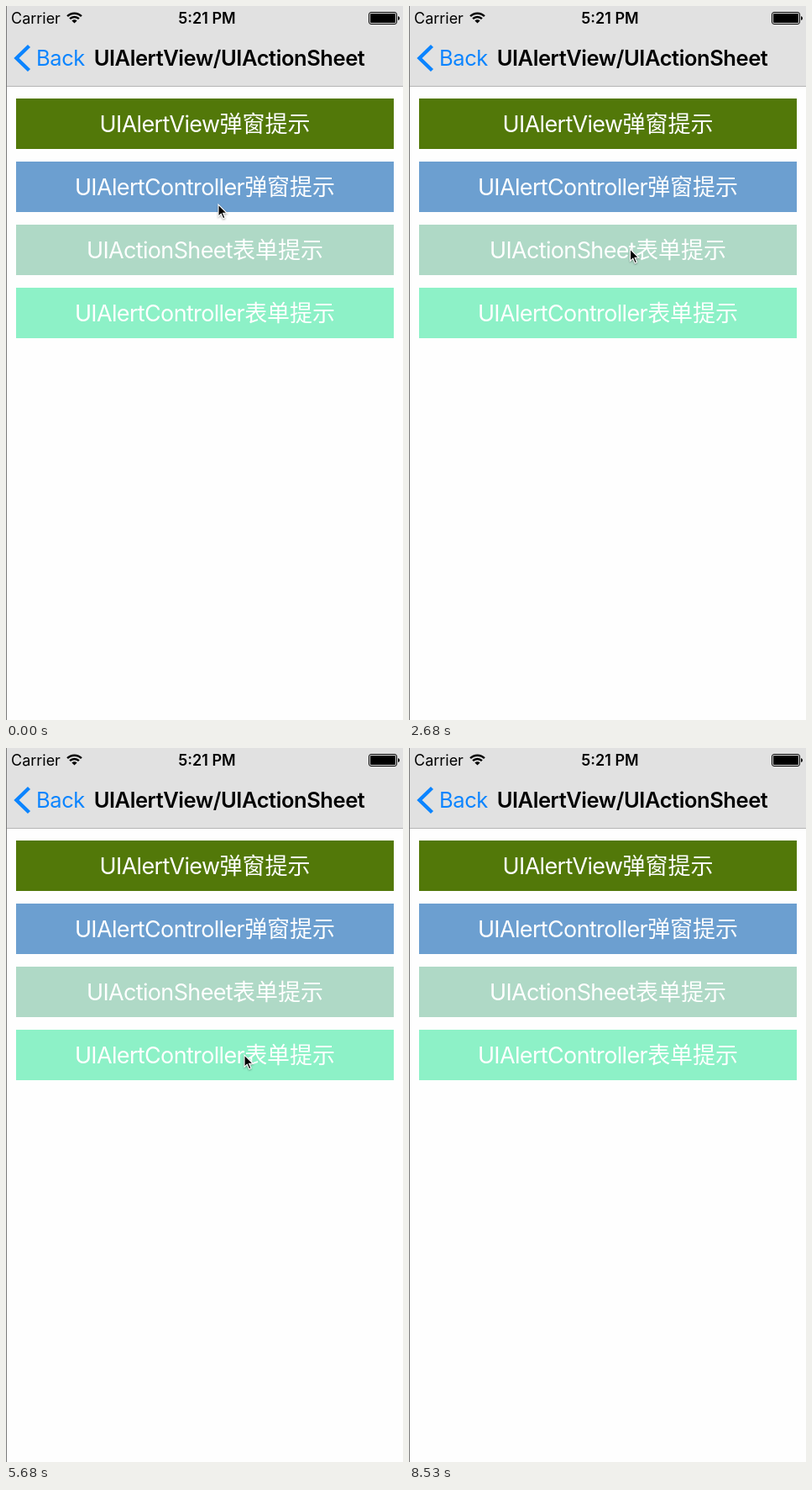
An HTML page for the animation above (8.9 s loop, 473 by 849 pixels).

```html
<!DOCTYPE html>
<html lang="zh-CN">
<head>
<meta charset="utf-8">
<title>UIAlertView/UIActionSheet</title>
<style>
html, body { margin: 0; width: 100%; height: 100%; overflow: hidden; background: #fefefe; }
body {
  position: relative; color: #000; white-space: nowrap;
  font-family: Inter, "Noto Sans CJK SC", "Noto Sans CJK", sans-serif;
}
#stage { position: absolute; left: 0; top: 0; width: 473px; height: 849px; overflow: hidden; background: #fefefe; }
#stage div, svg { position: absolute; box-sizing: border-box; }
.nav { left: 0; top: 0; width: 473px; height: 96px; background: #e1e1e1; border-bottom: 1px solid #b5b5b5; }
.edge { left: 0; top: 0; width: 1px; height: 849px; background: #7a7a7a; }
.dim { left: 0; top: 0; width: 473px; height: 849px; background: #000; opacity: 0; }
.bar { top: 4px; line-height: 21px; font-size: 18px; }
.head { top: 44px; line-height: 36px; font-size: 25.5px; letter-spacing: -.017em; }
.btn { left: 12px; width: 450px; height: 60px; line-height: 61px; font-size: 27px; color: #fff; text-align: center; }
.btn span { letter-spacing: -.024em; }
.bold { font-weight: 600; }
.medium { font-weight: 500; }
.alert, .sheet, .cancel { overflow: hidden; border-radius: 20px; text-align: center; }
.alert div, .sheet div, .cancel div { left: 0; width: 100%; }
.alert { left: 34.5px; top: 230px; width: 405px; height: 390px; background: rgba(252,252,252,.96); }
.row { border-top: 1px solid #dfdfdf; color: #0b84ff; }
.alert .row { height: 66.2px; line-height: 64px; font-size: 25.5px; }
.sheet .row, .cancel div { height: 86px; line-height: 83px; font-size: 30px; color: #0b84ff; }
.sheet, .cancel { left: 12px; width: 450px; }
.sheet {
  top: 389px; height: 349px;
  background: linear-gradient(#f5f9fb 18px, #fbfcfc 30px) 0 calc(var(--y, 0) * -1px) / 100% 349px no-repeat #fafbfb;
}
.cancel { top: 750px; height: 86px; background: #fbfcfc; }
.note { font-size: 19.5px; line-height: 26px; }
.note span { letter-spacing: -.006em; }
.grey { color: #929292; }
.row.on { background: #ececec; }
.row.on, .row.on + .row { border-color: #ececec; }
</style>
</head>
<body>
<div id="stage">
  <div class="nav"></div>
  <div class="btn" style="top:110px;background:#527809"><span>UIAlertView</span>弹窗提示</div>
  <div class="btn" style="top:185px;background:#6c9fd0"><span>UIAlertController</span>弹窗提示</div>
  <div class="btn" style="top:260px;background:#afd9c6"><span>UIActionSheet</span>表单提示</div>
  <div class="btn" style="top:335px;background:#8df1c7"><span>UIAlertController</span>表单提示</div>

  <div id="back">
    <svg width="40" height="96" style="left:0;top:0"><path d="M27.5 47.5 12.5 62l15 14.5" fill="none" stroke="currentColor" stroke-width="4.4"/></svg>
    <div class="head" style="left:36px">Back</div>
  </div>
  <div class="dim" id="dim"></div>

  <div class="bar" style="left:6px">Carrier</div>
  <div class="bar bold" style="left:139.5px;width:200px;text-align:center">5:21 PM</div>
  <div class="head bold" style="left:66px;width:400px;text-align:center">UIAlertView/UIActionSheet</div>
  <svg width="473" height="30" style="left:0;top:0">
    <g fill="none" stroke="#000" stroke-width="2.5">
      <path d="M73.1 12.1a11.9 11.9 0 0 1 16.8 0M76.1 15.1a7.7 7.7 0 0 1 10.8 0"/>
    </g>
    <path d="M81.5 20.6l-3.1-3.1a4.4 4.4 0 0 1 6.2 0z"/>
    <rect x="432.5" y="7.5" width="33" height="14" rx="2.5" fill="none" stroke="#000"/>
    <rect x="434" y="9" width="30" height="11" rx="1"/>
    <path d="M467 12q2 .5 2 2.5t-2 2.5z"/>
  </svg>

  <div class="alert" id="alert">
    <div class="medium" style="top:27px;line-height:36px;font-size:25.5px">温馨提示</div>
    <div class="note" style="top:70px"><span>UIAlertController</span>弹窗提示</div>
    <div class="row" style="top:126px">知道了</div>
    <div class="row" style="top:192.5px">拒绝了</div>
    <div class="row" style="top:258.5px">警告了</div>
    <div class="row medium" style="top:325px" id="alertCancel">取消</div>
  </div>

  <div id="sheetGroup" style="left:0;top:0">
    <div class="sheet">
      <div class="note grey medium" style="top:21px">温馨提示</div>
      <div class="note grey" style="top:47px"><span id="kind"></span>表单提示</div>
      <div class="row" style="top:93px">知道了</div>
      <div class="row" style="top:179px" id="refuse">拒绝了</div>
      <div class="row" style="top:264.5px" id="warn">警告了</div>
    </div>
    <div class="cancel"><div class="medium" style="top:0">取消</div></div>
  </div>

  <div class="edge"></div>
  <svg id="cursor" width="18" height="24" viewBox="-2 -2 18 24" style="left:-2px;top:-2px">
    <path d="M0 0V14.2L3.3 11.2 5.7 16.8 8 15.8 5.6 10.3H10.2Z" fill="#000" stroke="#fff" stroke-width="1.1"
      style="filter:drop-shadow(0 1px 1px rgba(0,0,0,.35))"/>
  </svg>
</div>
<script>
const LOOP = 8900, TRAVEL = 468, DIM = .36;
const $ = id => document.getElementById(id);

// pointer stops: time, x, y
const path = [
  [0, 253, 236], [150, 253, 208], [750, 253, 208], [1790, 235.5, 582],
  [2230, 235.5, 582], [2680, 263.5, 289], [3130, 263.5, 289], [4330, 255, 776],
  [4630, 255, 776], [4930, 263.5, 673.5], [5380, 263.5, 673.5], [5680, 284, 365],
  [6280, 284, 365], [6880, 245.5, 638], [8080, 245.5, 638], [8230, 272, 688],
  [8380, 366, 838], [8530, 440, 900]
];

function tick(t) {
  const base = t < 1490 ? 0 : t < 1930 ? 1490 : 1930;
  return base + Math.floor((t - base) / 150) * 150;
}

// critically damped spring, 0 to 1
function spring(ms) {
  if (ms <= 0) return 0;
  const w = ms * .0228, rest = (1 + w) * Math.exp(-w);
  return rest < .02 ? 1 : 1 - rest;
}

const shown = (t, from, to) => spring(t - from) - spring(t - to);

function pointer(t) {
  const i = path.findIndex(p => p[0] > t);
  if (i < 0) return path[path.length - 1].slice(1);
  const [t0, x0, y0] = path[i - 1], [t1, x1, y1] = path[i];
  const k = 1 - (1 - (t - t0) / (t1 - t0)) ** 3;
  return [x0 + (x1 - x0) * k, y0 + (y1 - y0) * k];
}

function press(id, t, from) {
  $(id).classList.toggle("on", t >= from && t < from + 300);
}

function draw(t) {
  const alert = shown(t, 390, 1960);
  const sheet = shown(t, 2920, 5100) + shown(t, 6070, 7200);
  const cover = Math.max(alert, sheet);
  const mix = (a, b) => Math.round(a + (b - a) * cover);

  $("dim").style.opacity = cover * DIM;
  $("back").style.color = `rgb(${mix(11, 140)},${mix(132, 140)},${mix(255, 140)})`;

  const box = $("alert").style;
  box.opacity = alert;
  box.transform = alert < 1 && t < 1900 ? `scale(${1.2 - .2 * alert})` : "none";

  const y = (1 - sheet) * TRAVEL, group = $("sheetGroup").style;
  group.visibility = sheet > 0 ? "visible" : "hidden";
  group.transform = `translateY(${y}px)`;
  group.setProperty("--y", y);
  $("kind").textContent = t < 6000 ? "UIActionSheet" : "UIAlertController";

  press("alertCancel", t, 1930);
  press("warn", t, 5080);
  press("refuse", t, 7180);

  const [px, py] = pointer(t);
  $("cursor").style.transform = `translate(${px}px,${py}px)`;
}

function frame() {
  draw(tick(performance.now() % LOOP));
  requestAnimationFrame(frame);
}
frame();
</script>
</body>
</html>
```
